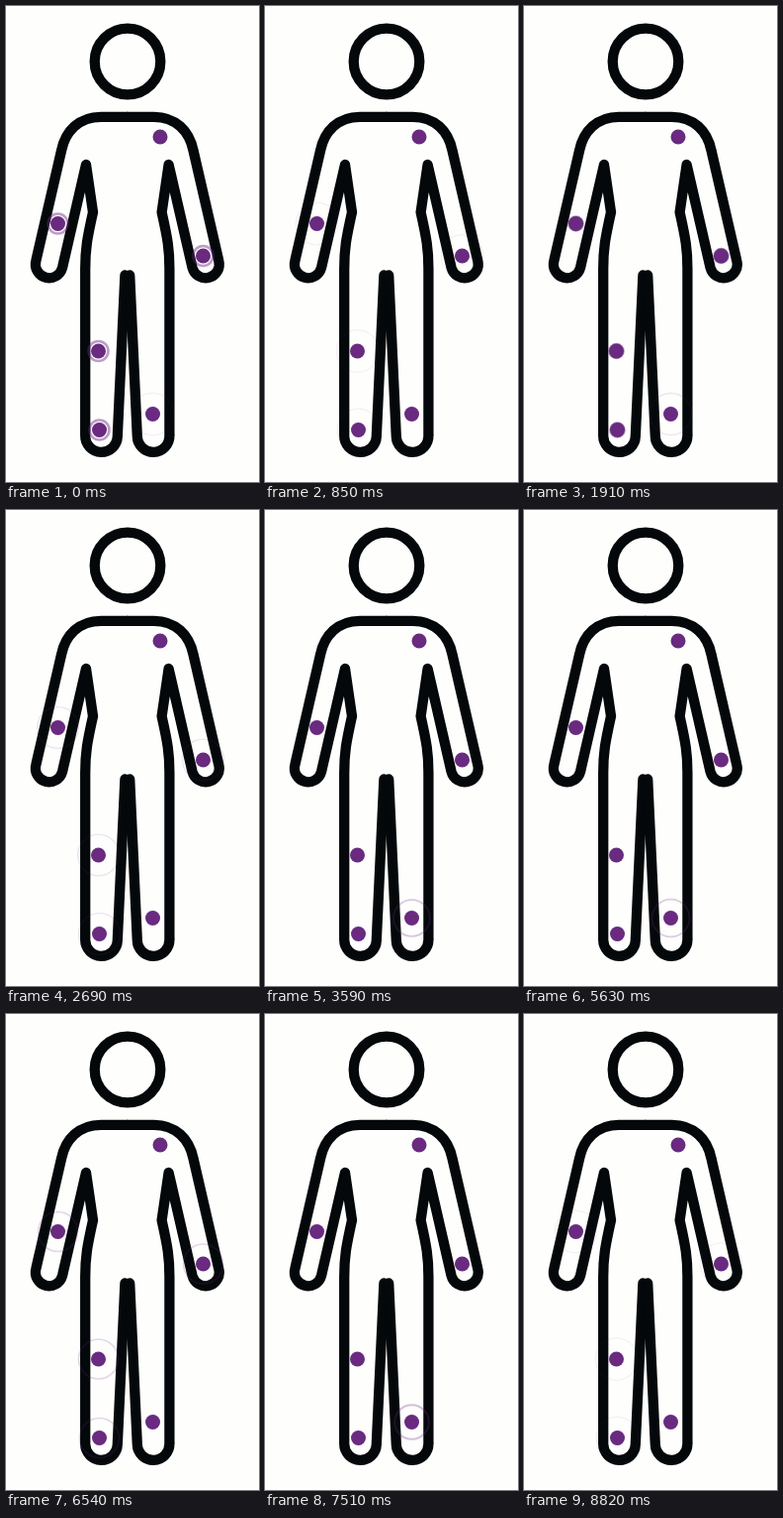
Write an HTML page that moves like this. It is 256x480 px and loops after 8.88 s.

```html
<!DOCTYPE html>
<html lang="en">
<head>
<meta charset="utf-8">
<title>Body points</title>
<style>
  html, body { margin: 0; height: 100%; overflow: hidden; background: #fefefd; }
  svg { display: block; width: 100%; height: 100%; }
  .outline { fill: none; stroke: #04080a; stroke-width: 10.3; stroke-linecap: round; stroke-linejoin: round; }
  #rings { fill: none; stroke: #692a80; }
  #dots { fill: #692a80; }
</style>
</head>
<body>
<svg viewBox="0 0 256 480">
  <g class="outline">
    <circle cx="123" cy="56" r="33.3"/>
    <path id="half" d="M123 111.8H96C74 111.8 60 126 56 146L30.3 257A13.5 13.5 0 0 0 57 264L81 160 88 208C82 235 80.2 245 80.2 265V433A16.3 16.3 0 0 0 112.8 434L120.4 271.5"/>
    <use href="#half" transform="matrix(-1 0 0 1 245.6 0)"/>
  </g>
  <g id="rings"></g>
  <g id="dots"></g>
</svg>
<script>
const LOOP = 8880, PERIOD = 2000, GROW = 1200;
const DOT_RADIUS = 7.5, RING_START = 6.5, RING_END = 21.5;

// start: when the pulse begins within each period; null means no pulse
const points = [
  { x: 156, y: 132, start: null },
  { x: 52.5, y: 219.5, start: 1900 },
  { x: 199.5, y: 252, start: 1900 },
  { x: 93.5, y: 348, start: 1900 },
  { x: 94.5, y: 427.5, start: 1900 },
  { x: 148.5, y: 411.5, start: 1100 }
];

function addCircle(parentId, { x, y }) {
  const circle = document.createElementNS('http://www.w3.org/2000/svg', 'circle');
  setAttributes(circle, { cx: x, cy: y, r: DOT_RADIUS });
  return document.getElementById(parentId).appendChild(circle);
}

function setAttributes(element, attributes) {
  for (const name in attributes) element.setAttribute(name, attributes[name]);
}

for (const point of points) {
  addCircle('dots', point);
  if (point.start !== null) point.ring = addCircle('rings', point);
}

function draw(now) {
  const time = now % LOOP;
  for (const { ring, start } of points) {
    if (!ring) continue;
    const age = (time - start + PERIOD) % PERIOD;
    const left = Math.max(0, 1 - age / GROW);
    setAttributes(ring, {
      r: RING_START + (RING_END - RING_START) * (1 - left ** 3),
      'stroke-width': 0.6 + 2.2 * left,
      'stroke-opacity': 0.5 * left ** 1.3
    });
  }
}

const origin = performance.now();
function tick() {
  draw(performance.now() - origin);
  requestAnimationFrame(tick);
}
tick();
</script>
</body>
</html>
```
